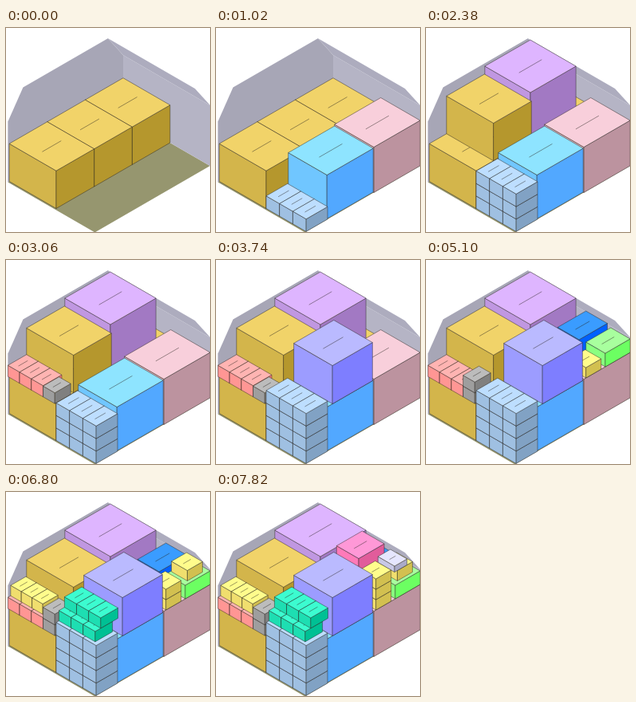
An HTML page with a canvas that plays this animation: 256x256 px, repeating every 8 s.

```html
<!DOCTYPE html>
<html>
<head>
<meta charset="utf-8">
<style>
html, body { margin: 0; width: 100%; height: 100%; overflow: hidden; background: #fff; }
canvas { display: block; width: 100vw; height: 100vh; }
</style>
</head>
<body>
<canvas id="stage" width="256" height="256"></canvas>
<script>
const ctx = document.getElementById('stage').getContext('2d');
const LOOP = 8000, STEP = 340, EPS = .01;
const ROOM = { a: 167, b: 126, low: 76, high: 108, cut: 22 };
const LINE = 'rgba(40,36,32,.46)';

// A kind of box: size along a, b and z, and its middle tone
const kind = (da, db, h, ...rgb) => ({ da, db, h, rgb });
const gold = kind(55, 68, 47.3, 211, 181, 75);
const pink = kind(67, 57, 57, 218, 177, 189);
const cyan = kind(67, 56, 55, 112, 198, 285);
const sky = kind(31, 19.3, 15.7, 159, 192, 226);
const purple = kind(66, 66, 57, 192, 151, 225);
const red = kind(27, 17, 14, 285, 150, 148);
const gray = kind(23, 17, 13.5, 158, 158, 158);
const indigo = kind(58, 56, 48, 156, 156, 285);
const blue = kind(41, 31, 25, 28, 126, 285);
const green = kind(36, 28, 17, 138, 285, 128);
const lemon = kind(22, 23, 13, 240, 222, 110);
const slim = { ...lemon, db: 15.5 };
const teal = kind(25, 17.5, 13, 30, 222, 178);
const rose = kind(37, 32, 24, 255, 122, 185);
const lilac = kind(18, 24, 7.5, 200, 200, 230);

const boxes = [];
let steps = 0;

// One packing step: a row of boxes dropped at (a, b), each landing on what lies below
function pack(k, a, b, count = 1, axis = 'b') {
  for (let i = 0; i < count; i++) {
    const a0 = a + (axis === 'a' ? i * k.da : 0), b0 = b + (axis === 'b' ? i * k.db : 0);
    const a1 = a0 + k.da, b1 = b0 + k.db;
    const below = boxes.filter(o => o.a0 < a1 - EPS && a0 < o.a1 - EPS && o.b0 < b1 - EPS && b0 < o.b1 - EPS);
    const z0 = Math.max(0, ...below.map(o => o.z1));
    boxes.push({ a0, a1, b0, b1, z0, z1: z0 + k.h, rgb: k.rgb, step: steps });
  }
  steps++;
}

const lane = gold.db, side = lane + 1, mid = pink.da, front = 2 * mid;
const pileA = 42, pileB = ROOM.b - lemon.db;
const grayA = ROOM.a - gray.da, grayB = lane - gray.db;
const greenB = ROOM.b - green.db;

pack(gold, 0, 0, 3, 'a');
pack(pink, 0, side);
pack(cyan, mid, side);
for (let i = 0; i < 3; i++) pack(sky, front, lane, 3);
pack(purple, 18.5, 0);
pack(gold, 85, 0);
pack(red, ROOM.a - red.da, 0, 3);
pack(gray, grayA, grayB);
pack(sky, front, lane, 3);
pack(indigo, mid + 1, side);
pack(blue, 5, greenB - blue.db);
pack(green, 0, greenB);
pack(lemon, pileA, pileB);
pack(gray, grayA, grayB);
pack(slim, 141, 0, 3);
pack(teal, front + 2, lane, 3);
pack(lemon, pileA, pileB);
pack(lemon, 7, greenB + 1);
pack(teal, front - 6, lane, 3);
pack(rose, 24, purple.db);
pack(lemon, pileA, pileB);
pack(lilac, 15, greenB);

// Order the boxes from back to front
const clears = (p, q) => p.a1 <= q.a0 + EPS || p.b1 <= q.b0 + EPS || p.z1 <= q.z0 + EPS;
const behind = (p, q) => clears(p, q) && !clears(q, p);
const ordered = [], rest = [...boxes];
while (rest.length) {
  const i = rest.findIndex(p => !rest.some(q => behind(q, p)));
  ordered.push(...rest.splice(Math.max(i, 0), 1));
}

// Isometric projection: a runs down-left, b down-right, z up
const iso = (a, b, z) => [147 + (b - a) * .866, 110 + (a + b) / 2 - z];

function poly(points, fill, stroke) {
  ctx.beginPath();
  points.forEach(p => ctx.lineTo(...iso(...p)));
  if (fill) {
    ctx.closePath();
    ctx.fillStyle = fill;
    ctx.fill();
  }
  if (stroke) {
    ctx.strokeStyle = stroke;
    ctx.stroke();
  }
}

function drawRoom({ a, b, low, high, cut }) {
  poly([[0, 0, 0], [a, 0, 0], [a, b, 0], [0, b, 0]], '#96966f');
  poly([[0, 0, 0], [0, 0, low], [cut, 0, high], [a - cut, 0, high], [a, 0, low], [a, 0, 0]], '#a7a6b6');
  poly([[0, 0, 0], [0, b, 0], [0, b, low], [0, 0, low]], '#b5b4c5');
  poly([[0, 0, low], [0, b, low], [cut, b, high], [cut, 0, high]], '#adacbe');
}

function drawBox({ a0, a1, b0, b1, z0, z1, rgb }) {
  const tone = d => `rgb(${rgb.map(v => v + d)})`;
  const inset = (a1 - a0) / 4, center = (b0 + b1) / 2;
  poly([[a1, b0, z0], [a1, b1, z0], [a1, b1, z1], [a1, b0, z1]], tone(0), LINE);
  poly([[a0, b1, z0], [a1, b1, z0], [a1, b1, z1], [a0, b1, z1]], tone(-30), LINE);
  poly([[a0, b0, z1], [a1, b0, z1], [a1, b1, z1], [a0, b1, z1]], tone(30), LINE);
  poly([[a0 + inset, center, z1], [a1 - inset, center, z1]], null, LINE);
}

function frame(now) {
  const step = Math.floor(now % LOOP / STEP);
  ctx.clearRect(0, 0, 256, 256);
  ctx.lineJoin = 'round';
  drawRoom(ROOM);
  ordered.filter(box => box.step <= step).forEach(drawBox);
  requestAnimationFrame(frame);
}
frame(0);
</script>
</body>
</html>
```
